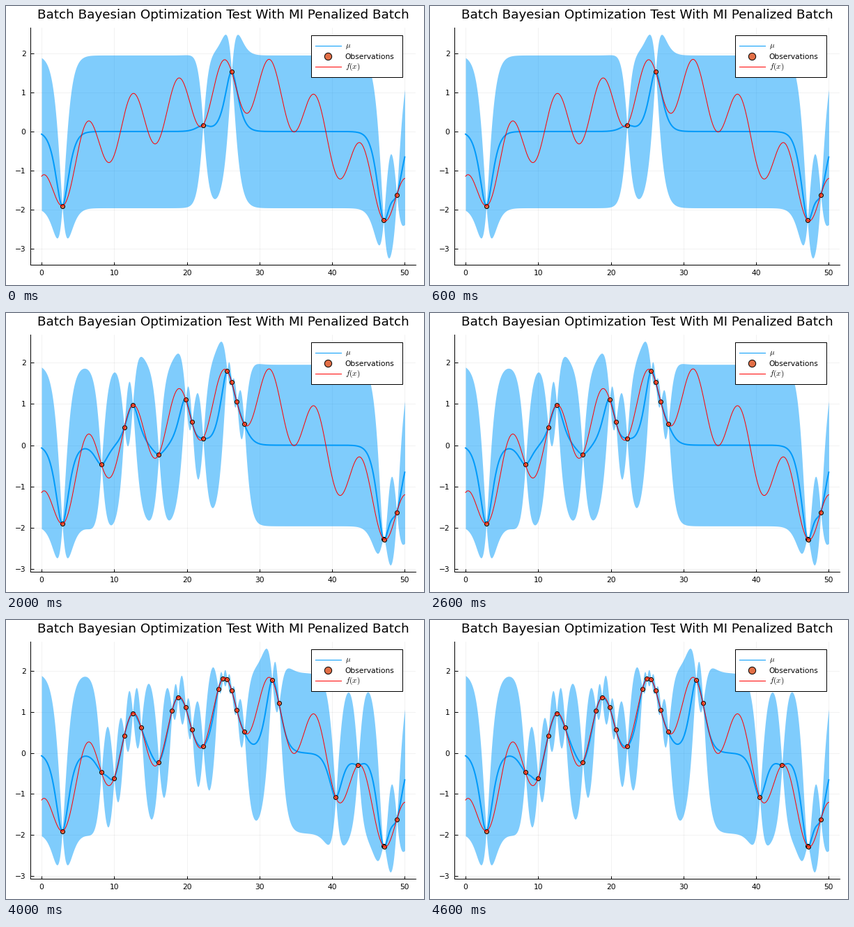
A matplotlib script that plays this animation: 600 px wide and 400 px high, repeating every 5 s.

```python
import numpy as np
import matplotlib.pyplot as plt
from matplotlib.animation import FuncAnimation
from matplotlib.patches import Rectangle

W, H, DPI = 600, 400, 100
PX = 72 / DPI  # points per pixel
BLUE, ORANGE, RED = "#009AFA", "#E26F46", "red"
BATCH, STEPS = 5, 5

plt.rcParams.update({"font.family": "DejaVu Sans", "mathtext.fontset": "cm"})

# Sample sites in the order they are taken, one batch per line.
SITES = np.array([
    2.85, 22.23, 26.16, 47.07, 48.90,
    8.24, 12.54, 19.83, 25.54, 27.89,
    11.39, 16.14, 20.69, 26.88, 47.17,
    13.69, 18.77, 24.96, 32.68, 40.50,
    9.98, 17.96, 24.34, 31.73, 43.57,
])
X = np.linspace(0, 50, 1501)


def f(x):
    return (0.743 * np.cos(x) + 0.25 * np.sin(x / 4)
            + 2.99 * np.sin(0.0629 * x) - 1.893)


def matern52(a, b):
    s = np.sqrt(5) * np.abs(a[:, None] - b[None, :])
    return (1 + s + s**2 / 3) * np.exp(-s)


def posterior(obs):
    """Mean and 95% half-width of a unit-variance GP on the grid X."""
    k = matern52(obs, X)
    w = np.linalg.solve(matern52(obs, obs) + 1e-6 * np.eye(len(obs)), k)
    var = 1 - np.sum(k * w, axis=0)
    return w.T @ f(obs), 1.96 * np.sqrt(np.clip(var, 0, None))


def padded(lo, hi):
    pad = 0.03 * (hi - lo)
    return lo - pad, hi + pad


fig = plt.figure(figsize=(W / DPI, H / DPI), dpi=DPI, facecolor="white")

left, right, top, bottom = 35.4, 588, 31, 371
ax = fig.add_axes([left / W, 1 - bottom / H, (right - left) / W, (bottom - top) / H])
ax.set_xlim(padded(0, 50))
ax.set_xticks(range(0, 51, 10))
ax.set_yticks(range(-3, 3))
ax.set_axisbelow(True)
ax.grid(color="black", alpha=0.1, lw=0.5 * PX)
ax.tick_params(direction="in", length=4.5 * PX, width=PX, pad=5, labelsize=10.67 * PX)
ax.spines[["top", "right"]].set_visible(False)
ax.spines[["left", "bottom"]].set_linewidth(PX)

mean_line, = ax.plot([], [], color=BLUE, lw=2 * PX, zorder=3)
dots, = ax.plot([], [], "o", color=ORANGE, ms=6 * PX, mec="black", mew=PX, zorder=4)
ax.plot(X, f(X), color=RED, lw=PX, zorder=5)

# Title and legend, laid out in pixels.
ui = fig.add_axes([0, 0, 1, 1], zorder=10)
ui.set(xlim=(0, W), ylim=(H, 0))
ui.axis("off")
ui.text(312, 17.8, "Batch Bayesian Optimization Test With MI Penalized Batch",
        size=13.24, ha="center")
ui.add_patch(Rectangle((438, 42), 131, 60, fc="white", ec="black", lw=PX))
for y, color, label in ((57, BLUE, r"$\mu$"), (87, RED, r"$f(x)$")):
    ui.plot([444, 481], [y, y], color=color, lw=PX)
    ui.text(486.7, y + 2.5, label, size=8)
ui.plot(462, 72, "o", color=ORANGE, ms=10.3 * PX, mec="black", mew=PX)
ui.text(486.7, 76.3, "Observations", size=10.67 * PX)

ribbon = None


def update(i):
    global ribbon
    obs = SITES[:BATCH * (i + 1)]
    mu, half = posterior(obs)
    if ribbon is not None:
        ribbon.remove()
    ribbon = ax.fill_between(X, mu - half, mu + half, color=BLUE, alpha=0.5,
                             lw=0, zorder=2)
    mean_line.set_data(X, mu)
    dots.set_data(obs, f(obs))
    ax.set_ylim(padded((mu - half).min(), (mu + half).max()))
    return ribbon, mean_line, dots


anim = FuncAnimation(fig, update, frames=STEPS, interval=1000,
                     init_func=lambda: update(0), repeat=True, repeat_delay=0)
plt.show()
```
